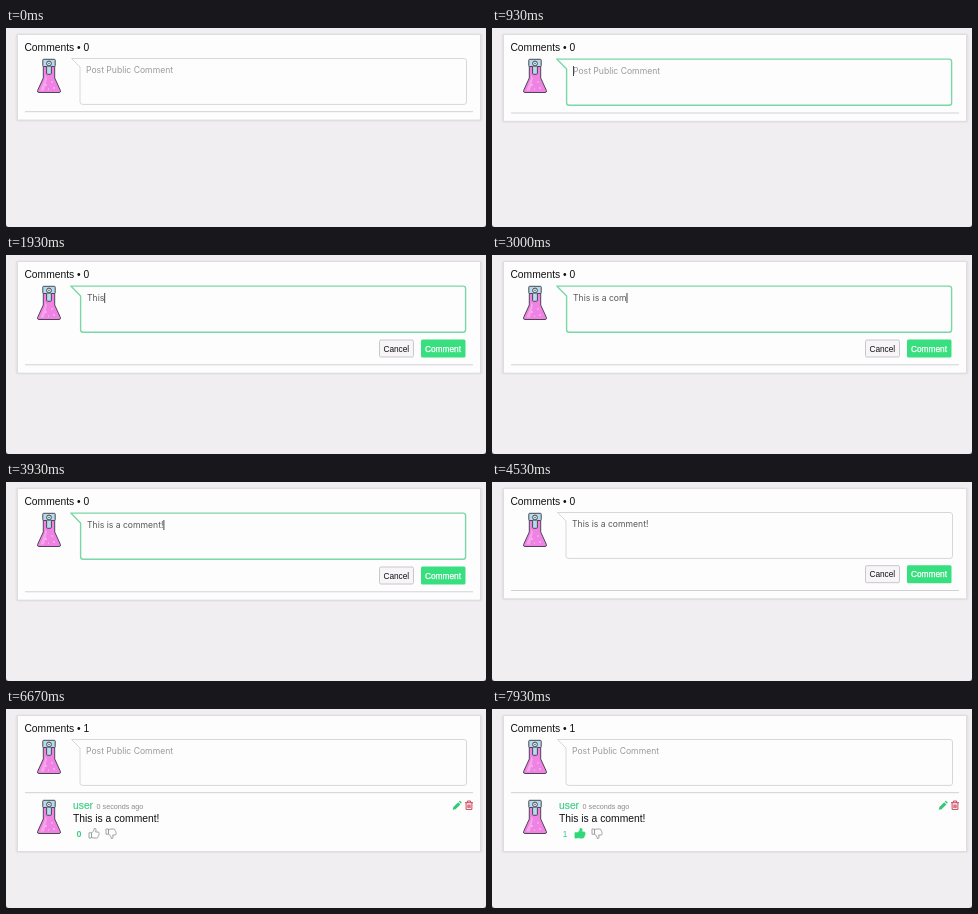
Recreate the animation shown at these times as an HTML page. Size 480 by 199 pixels, loop 8000 ms.

```html
<!DOCTYPE html>
<html lang="en">
<head>
<meta charset="utf-8">
<title>Comment box</title>
<style>
  html, body { margin: 0; width: 100%; height: 100%; overflow: hidden; background: #f0eef1; }
  svg { display: block; width: 100%; height: 100%; }
  text { font-family: "Liberation Sans", Arial, sans-serif; font-size: 10.3px; fill: #111; white-space: pre; }
  .field { font-family: Inter, sans-serif; font-size: 8.6px; }
  .button { font-size: 8.3px; }
  .green { fill: #3fcf87; }
  .icon { fill: none; stroke: #999; stroke-width: .9; stroke-linejoin: round; }
  .icon.liked { fill: #2fd879; stroke: #2fd879; }
</style>
</head>
<body>
<svg viewBox="0 0 480 199" preserveAspectRatio="none">
  <defs>
    <g id="flask" stroke="#4b4656" stroke-linejoin="round">
      <path d="M37.3 38V50L31.6 62.5Q31 64.5 33 64.5H53Q55 64.5 54.4 62.5L48.7 50V38Z" fill="#ef82e2"/>
      <path d="M39 47V51L34.2 62.5H38L41 50Z" fill="#f6a5ec" stroke="none"/>
      <rect x="36.8" y="31.3" width="12.4" height="7.2" rx=".8" fill="#b5dce9"/>
      <path d="M40.6 38.5V45.3Q40.6 46.3 41.6 46.3H44.4Q45.4 46.3 45.4 45.3V38.5" fill="#b5dce9"/>
      <circle cx="43" cy="35.5" r="2.4" fill="#d5edf4"/>
      <circle cx="43" cy="35.5" r=".7" fill="#4b4656" stroke="none"/>
      <g fill="#ffd9fa" stroke="none">
        <circle cx="40" cy="57" r=".8"/><circle cx="46" cy="54" r=".7"/>
        <circle cx="48" cy="60" r=".8"/><circle cx="42.5" cy="61" r=".6"/>
      </g>
    </g>
    <path id="thumb" d="M.5 5H3V10.2H.5ZM3 5.3 5 3.2Q5.7 2.2 5.7 .7Q7.8 .3 7.6 2.4L7.1 4.2H9.6Q10.9 4.4 10.5 5.6Q10.8 6.5 10.2 7.3Q10.3 8.2 9.6 8.7Q9.6 10.2 8.2 10.2H5.2L3 9.5Z"/>
  </defs>

  <rect width="480" height="199" fill="#f0eef1"/>
  <path d="M0 196V199H3Q0 199 0 196ZM480 196V199H477Q480 199 480 196Z" fill="#444"/>
  <rect id="shade" x="10.5" y="6.5" width="465" rx="1.5" fill="none" stroke="#e4e2e5" stroke-width="2"/>
  <rect id="card" x="11.5" y="6.5" width="463" rx="1" fill="#fefdfe" stroke="#d9d7da" stroke-width=".8"/>
  <text id="title" x="18.4" y="22.6"></text>
  <use href="#flask"/>

  <path id="bubble" fill="#fefdfe" stroke-linejoin="round"/>
  <text id="entry" class="field"></text>
  <rect id="caret" y="38" width=".9" height="10" fill="#333"/>

  <g id="buttons">
    <rect x="373.5" y="85" width="34" height="17" rx="1.5" fill="#f7f5f8" stroke="#c9c7ca"/>
    <text class="button" x="377.4" y="96.6">Cancel</text>
    <rect x="415" y="84.5" width="44.5" height="18" rx="1.5" fill="#38df7f"/>
    <text class="button" x="419" y="96.6" style="fill:#fff;stroke:#fff;stroke-width:.25">Comment</text>
  </g>
  <rect id="rule" x="19" width="448" height="1" fill="#d2d0d3"/>

  <g id="post">
    <use href="#flask" y="60"/>
    <text class="green" x="67" y="99.6" style="stroke:#3fcf87;stroke-width:.2">user</text>
    <text x="90.6" y="99.8" style="font-size:7.2px;fill:#8b8b8b">0 seconds ago</text>
    <text x="67" y="113.2">This is a comment!</text>
    <text id="score" class="green" x="70.6" y="127.6" style="font-size:9px"></text>
    <use id="like" class="icon" href="#thumb" x="82.5" y="118.8"/>
    <use class="icon" href="#thumb" transform="translate(99.5 130.2) scale(1 -1)"/>
    <path d="M446.7 100.8 447.4 98 452.2 93.2 454.4 95.4 449.6 100.2ZM452.8 92.6 453.4 92Q454 91.6 454.6 92.2L455.4 93Q455.9 93.6 455.4 94.2L454.9 94.8Z" fill="#35c878"/>
    <path d="M459 93.7H467M461.4 93.5V92H464.6V93.5M460.1 94V100.4H465.9V94M461.9 95.5V99M463 95.5V99M464.1 95.5V99" fill="none" stroke="#c5283f" stroke-width=".85"/>
  </g>
</svg>
<script>
const LOOP = 8000;
const FOCUS = 920, OPEN = 990, TYPE = 1545, STEP = 119, BLUR = 4465, SEND = 4800, LIKE = 7300;
const MESSAGE = "This is a comment!";
const $ = id => document.getElementById(id);
const set = (id, attrs) => {
  for (const key in attrs) $(id).setAttribute(key, attrs[key]);
};
const show = (id, on) => set(id, { visibility: on ? "visible" : "hidden" });

// Speech bubble with its tail at the top left
function bubblePath(tip, left, top, right, bottom) {
  const tail = left - tip, r = 2.5;
  return `M${tip} ${top}H${right - r}q${r} 0 ${r} ${r}V${bottom - r}q0 ${r} ${-r} ${r}` +
    `H${left + r}q${-r} 0 ${-r} ${-r}V${top + tail}Z`;
}

function caretOn(t, typed) {
  const lastKey = typed ? TYPE + (typed - 1) * STEP : FOCUS;
  return Math.floor((t - lastKey) / 500) % 2 === 0;
}

function draw(t) {
  const focused = t >= FOCUS && t < BLUR;
  const open = t >= OPEN && t < SEND;
  const sent = t >= SEND;
  const liked = t >= LIKE;
  const shift = focused ? 1.3 : 0;
  const typed = sent ? 0 : Math.max(0, Math.min(MESSAGE.length, Math.floor((t - TYPE) / STEP) + 1));

  const ruleY = (open ? 108 : 83.2) + shift;
  const height = (sent ? 142.5 : ruleY + 8.8) - 6.5;
  set("card", { height });
  set("shade", { height: height + .5 });
  set("rule", { y: ruleY });
  $("title").textContent = "Comments • " + (sent ? 1 : 0);

  set("bubble", focused
    ? { d: bubblePath(64.8, 74.6, 31.1, 459.6, 77.2), stroke: "#79d8a5", "stroke-width": 1.4 }
    : { d: bubblePath(65.5, 74, 30.5, 460.5, 76.4), stroke: "#d9d6da", "stroke-width": 1 });

  const x = focused ? 81 : 80;
  $("entry").textContent = typed ? MESSAGE.slice(0, typed) : "Post Public Comment";
  set("entry", { x, y: focused ? 46.1 : 45.4, fill: "#555" });
  $("entry").style.fill = typed ? "#555" : "#9b999c";
  set("caret", { x: x + (typed ? $("entry").getComputedTextLength() : 0) });
  show("caret", focused && caretOn(t, typed));

  set("buttons", { transform: `translate(0 ${shift - 1.3})` });
  show("buttons", open);

  show("post", sent);
  $("score").textContent = liked ? 1 : 0;
  $("score").style.fontWeight = liked ? 400 : 700;
  set("like", { class: liked ? "icon liked" : "icon" });
}

function tick(now) {
  draw(now % LOOP);
  requestAnimationFrame(tick);
}
draw(0);
requestAnimationFrame(tick);
</script>
</body>
</html>
```
